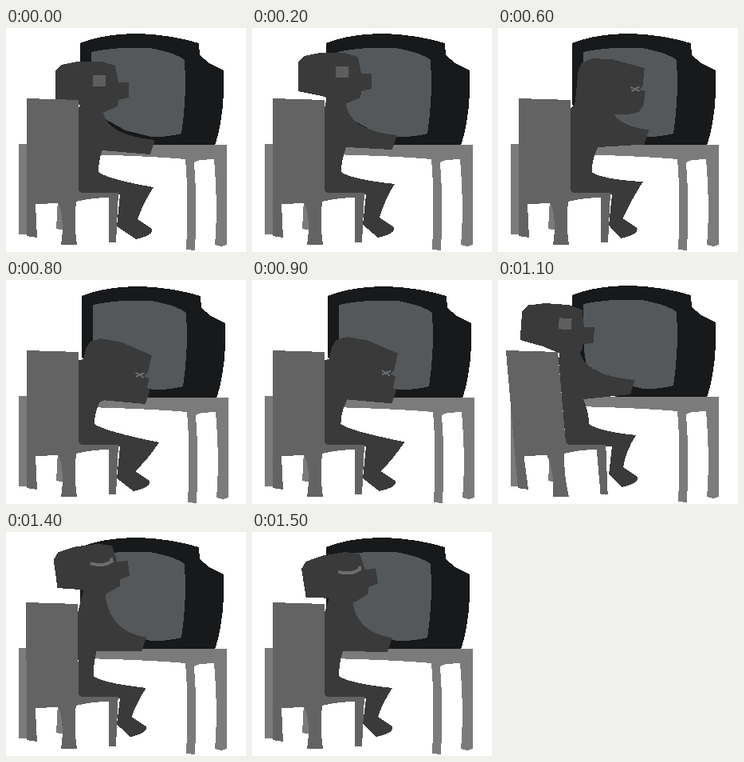
Write an HTML page that moves like this. It is 301x280 px and loops after 1700 ms.

```html
<!DOCTYPE html>
<html lang="en">
<head>
<meta charset="utf-8">
<title>Bad day at the desk</title>
<style>
  html, body { margin: 0; width: 100%; height: 100%; overflow: hidden; background: #fff; }
  svg { display: block; width: 100%; height: 100%; shape-rendering: crispEdges; }
  .case { fill: #17191b; }
  .screen { fill: #54585a; }
  .desk { fill: #7b7b7b; }
  .person { fill: #3a3a3a; }
  .chair { fill: #636363; }
  .eye { fill: #5e5e5e; }
  .line { fill: none; stroke: #6c6c6c; stroke-width: 2; }
  .squint { stroke-width: 4; }
</style>
</head>
<body>
<svg viewBox="0 0 301 280">
  <defs>
    <path id="skull" d="M62 54 L69 46 L90 42 H120 L137 47 L141 68 H154 V87 L141 90 L140 98 L121 106 L91 96 L62 90Z"/>
  </defs>
  <path class="desk" d="M16 145 H28 V258 H16Z M65 214 H74 V253 L63 251Z"/>
  <g id="set">
    <path class="case" d="M93 19 Q122 7 168 7 Q210 9 242 19 L243 34 L255 44 L273 53 V82 Q271 120 262 147 H150 L112 125 L93 95Z"/>
    <path class="screen" d="M107 30 Q140 23 180 25 Q213 31 224 40 Q227 85 220 132 Q198 137 182 136 L150 128 L112 107 Q106 95 107 30Z"/>
    <path class="desk" d="M98 146 H277 V271 L270 273 L262 271 Q266 225 261 164 L243 165 L236 168 Q240 220 237 278 L226 277 Q229 210 225 164 Q180 160 98 158Z"/>
  </g>
  <path class="person" id="body"/>
  <g class="person">
    <g id="level"><use href="#skull"/><path class="eye" d="M109 59 h16 v14 h-16Z"/></g>
    <g id="wince"><use href="#skull"/><path class="line squint" d="M107 65 Q123 72 134 66 L134 62"/></g>
    <g id="bow">
      <path d="M90 109 L97 94 L101 54 L105 45 L118 39 L144 40 L184 51 L182 73 L178 78 L185 80 L183 97 L177 106 L164 109 L146 109 L100 130Z"/>
      <path class="line" d="M167 75 L178 80 M168 80 L178 74"/>
    </g>
  </g>
  <path class="chair" id="chair" d="M26 88 L91 90 V200 Q91 206 97 206 H141 L138 268 H129 V212 Q108 212 88 217 Q85 245 89 271 H69 Q74 240 66 219 L37 220 L39 262 L26 260Z"/>
</svg>
<script>
const $ = id => document.getElementById(id);

// dx, dy, turn move the head; the rest are joints, plus chair tilt and desk jolt
const pose = (face, [dx, dy, turn], neck, hand, [belly, hip], knee, toe, tilt = 0, jolt = 0) => ({
  face, dx, dy, turn, nx: neck[0], ny: neck[1], hx: hand[0], hy: hand[1], belly, hip,
  kx: knee[0], ky: knee[1], tx: toe[0], ty: toe[1], tilt, jolt
});

const sit = pose('level', [0, 0, 0], [122, 105], [187, 140], [121, 116], [185, 199], [183, 251]);
const rise = pose('level', [-4, -11, 0], [118, 96], [182, 134], [118, 112], [179, 195], [178, 249]);
const peer = pose('bow', [0, 0, 0], [146, 104], [190, 127], [126, 118], [182, 192], [174, 250]);
const slam = pose('bow', [-3, 32, 8], [150, 125], [181, 137], [119, 111], [192, 203], [180, 251], 0, 1);
const recoil = pose('level', [-33, -12, 4], [103, 90], [172, 125], [107, 114], [173, 194], [175, 246], 1);
const lean = pose('level', [-24, -11, 3], [108, 95], [178, 125], [110, 115], [174, 194], [173, 245], .5);
const shrug = pose('wince', [2, -15, -9], [126, 86], [176, 132], [114, 109], [176, 195], [176, 243]);

const mix = (a, b, k) => Object.fromEntries(Object.keys(b).map(
  key => [key, key === 'face' ? b.face : a[key] + (b[key] - a[key]) * k]));
const raise = (p, h) => ({ ...p, dy: p.dy - h, ny: p.ny - h });

const beats = [
  [0, sit],
  [100, mix(sit, rise, .5)],
  [200, rise],
  [300, mix(sit, rise, 1.3)],
  [500, peer],
  [600, mix(rise, peer, .92)],
  [800, slam],
  [900, { ...mix(peer, slam, .94), jolt: 1 }],
  [1100, recoil],
  [1200, lean],
  [1400, raise(mix(lean, shrug, .9), 11)],
  [1500, { ...shrug }]
];

// Back, neck and arm, then belly, thigh, shin and foot.
const bodyPath = p => `
  M${91 - 5.7 * p.tilt} 207 L${91 - 15 * p.tilt} 100
  L${p.nx - 20} ${p.ny - 30} L${p.nx} ${p.ny}
  Q${p.nx + 5} ${p.hy - 6} ${p.hx} ${p.hy} l-6 18
  L${p.belly} ${Math.max(149, p.hy + 13)}
  Q${p.hip} 165 ${p.hip} 180
  Q${p.hip + 12} 189 ${p.kx} ${p.ky}
  Q${p.kx - 13} ${p.ky + 20} ${p.tx - 18} ${p.ty - 12}
  L${p.tx} ${p.ty} q3 8 -20 13
  L139 ${p.ty - 3} L143 208Z`;

function show(p) {
  $('body').setAttribute('d', bodyPath(p));
  for (const face of ['level', 'wince', 'bow']) {
    $(face).style.display = face === p.face ? '' : 'none';
  }
  $(p.face).setAttribute('transform', `translate(${p.dx} ${p.dy}) rotate(${p.turn} 105 70)`);
  $('chair').setAttribute('transform', `translate(${-23.8 * p.tilt} 0) skewX(${5 * p.tilt})`);
  $('set').setAttribute('transform', `translate(${2 * p.jolt} ${p.jolt})`);
}

let shown;
function tick() {
  const t = performance.now() % 1700;
  const [, p] = beats.findLast(([start]) => start <= t);
  if (p !== shown) show(shown = p);
  requestAnimationFrame(tick);
}
tick();
</script>
</body>
</html>
```
